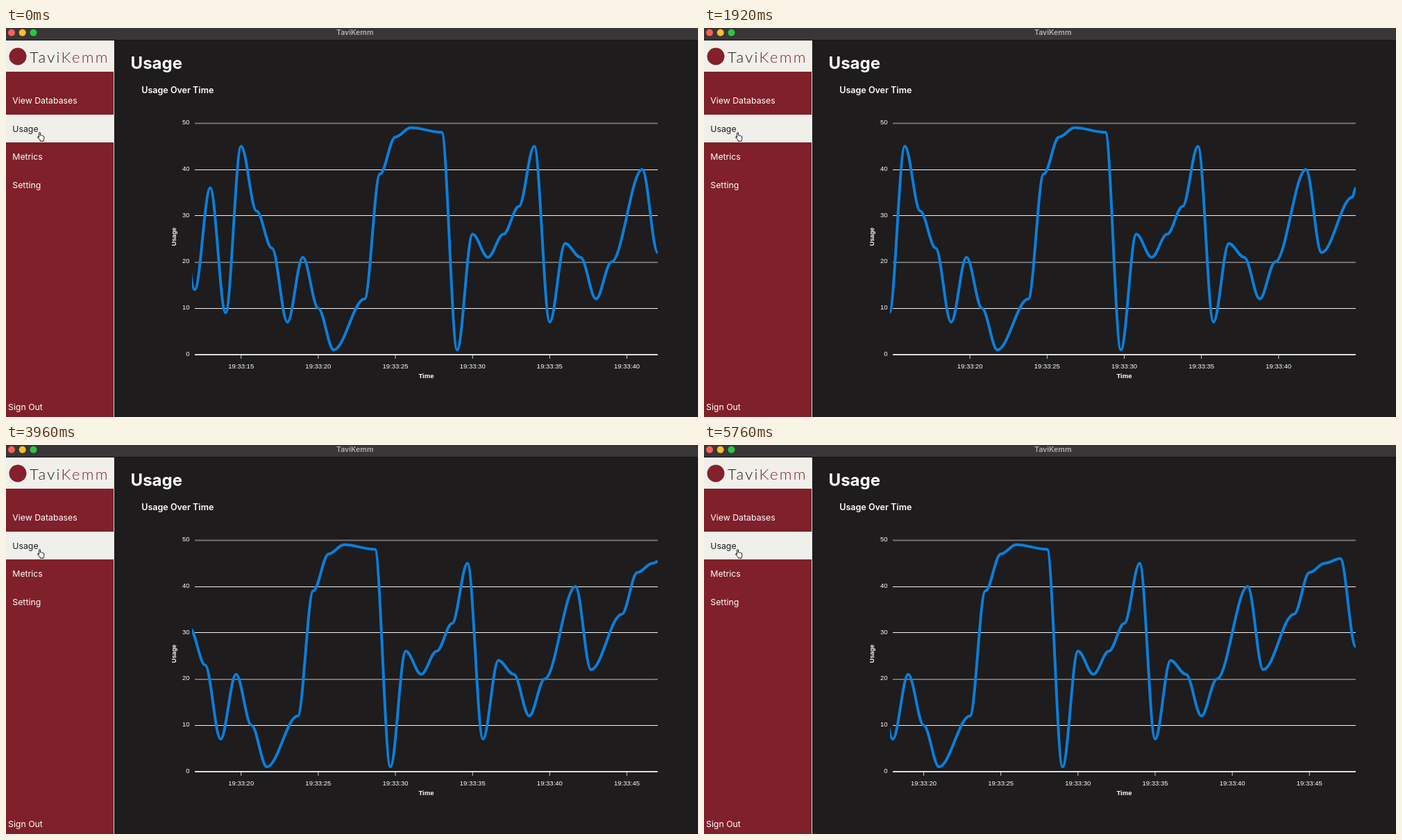
Write an HTML page that moves like this. It is 997 by 561 pixels and loops after 6.32 s.

```html
<!DOCTYPE html>
<html lang="en">
<head>
<meta charset="utf-8">
<title>Usage</title>
<style>
  html, body { margin: 0; width: 100%; height: 100%; overflow: hidden; background: #1e1c1d; }
  svg { display: block; width: 997px; height: 561px; font-family: Inter, sans-serif; fill: #fff; }
  .nav { font-size: 12.3px; }
  .chart { font: 9.5px "Liberation Sans", Arial, sans-serif; }
  .bold { font-weight: 700; }
  .logo { font: 300 22px Lato, sans-serif; letter-spacing: 2.3px; fill: #1c1a1b; }
</style>
</head>
<body>
<svg viewBox="0 0 997 561">
  <defs><clipPath id="plot"><rect x="268" y="130" width="671.3" height="345"/></clipPath></defs>

  <!-- Window bar -->
  <rect width="997" height="17" fill="#383637"/>
  <rect y="17" width="997" height="1" fill="#171516"/>
  <circle cx="8" cy="6.8" r="5" fill="#fe5f57"/>
  <circle cx="23.7" cy="6.8" r="5" fill="#febc2e"/>
  <circle cx="39.5" cy="6.8" r="5" fill="#28c840"/>
  <text x="502.7" y="10.3" text-anchor="middle" font-size="10.6" font-weight="600" fill="#b3b1b2">TaviKemm</text>

  <!-- Sidebar -->
  <rect y="18" width="155" height="543" fill="#7f202a"/>
  <rect x="155" y="18" width="1" height="543" fill="#e3dedc"/>
  <rect y="18" width="155" height="45" fill="#f0efea"/>
  <circle cx="17" cy="41" r="12.5" fill="#84202c"/>
  <text class="logo" x="34" y="49.5">Tavi<tspan fill="#84202c">Kemm</tspan></text>
  <rect y="125" width="155" height="40" fill="#f0efea"/>
  <g class="nav">
    <text x="9.3" y="109.3">View Databases</text>
    <text x="9.3" y="149.8" fill="#1e1c1d">Usage</text>
    <text x="9.3" y="190.1">Metrics</text>
    <text x="9.3" y="230.5">Setting</text>
    <text x="3" y="550.5">Sign Out</text>
  </g>
  <path d="M47.6 158v-6.1q0-1.3 1-1.3t1 1.3v3q1.6-.6 2 .5 1.300-.5 1.700.5 1.500-.2 1.500 1.300v2.400q0 1.200-.8 2.300v1.300h-4.700v-1.200l-3.400-3.900q-.9-1.200.1-1.500.7-.2 1.600 1.400z"
    fill="#fff" stroke="#111" stroke-width="1" stroke-linejoin="round"/>

  <!-- Main panel -->
  <text class="bold" x="179.600" y="59.300" font-size="24">Usage</text>
  <text x="195.300" y="94.200" font-size="12.500" font-weight="600">Usage Over Time</text>
  <g class="chart">
    <g id="grid"></g>
    <rect x="272" y="470.300" width="667" height="1.700"/>
    <g id="ticks" text-anchor="middle"></g>
    <text class="bold" x="605.500" y="504.800" text-anchor="middle">Time</text>
    <text class="bold" transform="translate(245.200 301) rotate(-90)" text-anchor="middle" font-size="8.800">Usage</text>
  </g>
  <path id="line" clip-path="url(#plot)" fill="none" stroke="#0a7fdb" stroke-width="4"/>
</svg>
<script>
const LOOP = 6320, MORPH = 980, SECOND = 667 / 30;

// Usage by second of the clock; some seconds have no reading.
const readings = [
  [11, 36], [12, 14], [13, 36], [14, 9], [15, 45], [16, 31], [17, 23], [18, 7],
  [19, 21], [20, 10], [21, 1], [23, 12], [24, 39], [25, 47], [26, 49], [28, 48],
  [29, 1], [30, 26], [31, 21], [32, 26], [33, 32], [34, 45], [35, 7], [36, 24],
  [37, 21], [38, 12], [39, 20], [41, 40], [42, 22], [44, 34], [45, 43], [46, 45],
  [47, 46], [48, 27]
];

// When each new reading arrives (ms), and its second.
const updates = [[743, 44], [1704, 45], [2668, 46], [3641, 47], [4610, 48]];

const $ = id => document.getElementById(id);
const mix = (a, b, p) => a + (b - a) * p;
const xAt = (sec, end) => 939 + (sec - end) * SECOND;
const yAt = value => 470.9 - value * 6.675;

$("grid").innerHTML = [10, 20, 30, 40, 50].map(v => {
  const soft = v === 20 || v === 50;
  const y = { 10: 404, 20: 337, 30: 270, 40: 204, 50: 136.5 }[v];
  return `<rect x="272" y="${y}" width="667" height="${soft ? 2 : 1}" fill="${soft ? "#727071" : "#f2f2f2"}"/>`;
}).join("") + [0, 10, 20, 30, 40, 50].map(v =>
  `<text x="264.500" y="${yAt(v) + 2}" text-anchor="end">${v}</text>`).join("");

function drawTicks(end) {
  let out = "";
  for (let s = 15; s < end; s += 5) {
    const x = xAt(s, end);
    if (x > 273) out += `<rect x="${x - .5}" y="472" width="1" height="5" fill="#cfcfcf"/>` +
      `<text x="${x}" y="491.300">19:33:${s}</text>`;
  }
  $("ticks").innerHTML = out;
}

// The curve slides from its old window to the new one; a new point grows out of the last one.
function drawLine(from, to, p) {
  const shown = readings.filter(r => r[0] <= to);
  const last = shown.filter(r => r[0] <= from).pop();
  let px, py;
  $("line").setAttribute("d", shown.map(([sec, value], i) => {
    const [oldSec, oldValue] = sec > from ? last : [sec, value];
    const x = mix(xAt(oldSec, from), xAt(sec, to), p);
    const y = yAt(mix(oldValue, value, p));
    const reach = (x - px) * .35;
    const part = i ? `C${px + reach} ${py} ${x - reach} ${y} ${x} ${y}` : `M${x} ${y}`;
    px = x;
    py = y;
    return part;
  }).join(""));
}

let tickEnd;
function frame(now) {
  const t = now % LOOP;
  let from = 42, to = 42, start = 0;
  for (const [time, sec] of updates) {
    if (t >= time) [from, to, start] = [to, sec, time];
  }
  if (to !== tickEnd) drawTicks(tickEnd = to);
  drawLine(from, to, Math.min(1, (t - start) / MORPH));
  requestAnimationFrame(() => frame(performance.now() - origin));
}
const origin = performance.now();
frame(0);
</script>
</body>
</html>
```
